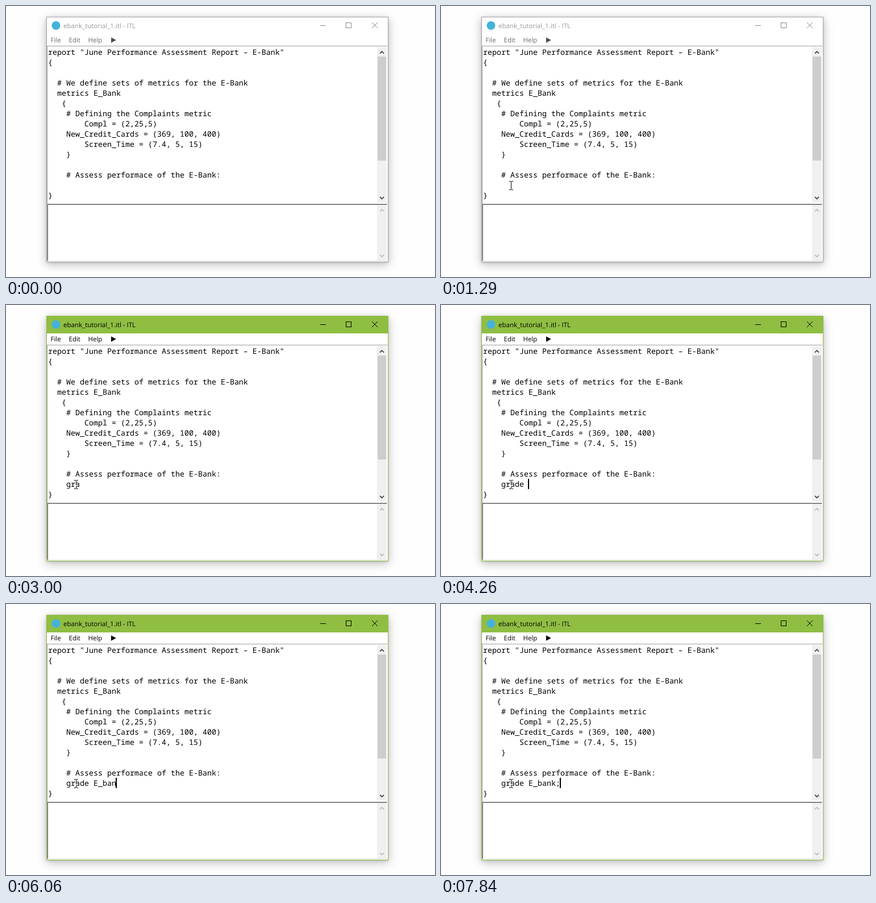
Recreate the animation shown at these times as an HTML page. Size 755 by 477 pixels, loop 8000 ms.

```html
<!DOCTYPE html>
<html lang="en">
<head>
<meta charset="utf-8">
<title>Editor</title>
<style>
  html, body { margin: 0; width: 100%; height: 100%; overflow: hidden; background: #fefefe; }
  #win {
    position: absolute; left: 71px; top: 19px; width: 602px; height: 432px;
    background: #fff;
    box-shadow: 0 1px 4px rgba(0, 0, 0, .14), 0 4px 16px rgba(0, 0, 0, .26);
  }
  svg { position: absolute; left: 0; top: 0; display: block; }
  text { white-space: pre; text-rendering: geometricPrecision; }
  .code text { font: 13.3333px "Noto Sans Mono", "DejaVu Sans Mono", monospace; }
  .ui { font: 11.5px "Open Sans", "Noto Sans", sans-serif; }
  .crisp { shape-rendering: crispEdges; }

  #frame { fill: #a6a6a6; }
  #bar { fill: #fff; }
  #title { fill: #999; }
  #buttons { stroke: #8a8a8a; fill: none; }
  #menu { fill: #6d6d6d; }
  #play { fill: #4d4d4d; }
  .active #frame, .active #bar { fill: #8fbe43; }
  .active #title, .active #menu, .active #play { fill: #000; }
  .active #buttons { stroke: #000; }
  #pointer { fill: #fff; mix-blend-mode: difference; }
</style>
</head>
<body>
<div id="win"></div>
<svg id="stage" width="755" height="477" viewBox="0 0 755 477">
  <g class="crisp">
    <path id="frame" d="M71 19h602v432h-602z"/>
    <path d="M72 20h600v430h-600z" fill="#fff"/>
    <path id="bar" d="M72 20h600v30h-600z"/>
  </g>
  <circle cx="88" cy="34.3" r="7.6" fill="#45b2da"/>
  <text id="title" class="ui" x="101" y="39">ebank_tutorial_1.itl - ITL</text>
  <g id="buttons">
    <path class="crisp" d="M553 34.5h10M598.5 29.5h9v9h-9z"/>
    <path d="M644 29l10 10M654 29l-10 10"/>
  </g>
  <g id="menu" class="ui">
    <text x="78.5" y="64">File</text>
    <text x="110.5" y="64">Edit</text>
    <text x="144.5" y="64">Help</text>
  </g>
  <path id="play" d="M185 55.3l8.8 4.7l-8.8 4.7z"/>
  <g id="panes"></g>
  <g id="code" class="code"></g>
  <path id="caret" class="crisp" d="M105 306h2v18h-2z"/>
  <path id="pointer" class="crisp" d="M0 0h3v1h1v-1h3v1h-3v14h3v1h-3v-1h-1v1h-3v-1h3v-14h-3z"/>
  <circle id="click" cx="121" cy="315.3" r="12" fill="#ff0" fill-opacity=".47"/>
</svg>
<script>
const LOOP = 8000, CLICK = 1540;
const COL = 8, ROW = 18, LEFT = 74, TOP = 72;
const $ = id => document.getElementById(id);

function add(parent, name, attrs) {
  const el = document.createElementNS("http://www.w3.org/2000/svg", name);
  for (const key in attrs) el.setAttribute(key, attrs[key]);
  return parent.appendChild(el);
}

// Panes with scrollbars
const panes = $("panes");
const rect = (x, y, width, height, fill) =>
  add(panes, "rect", { x, y, width, height, fill, class: "crisp" });
const chevron = (y, dir, stroke) =>
  add(panes, "path", {
    d: `M658 ${y + 2 * dir}l3.5 ${-3.5 * dir}l3.5 ${3.5 * dir}`,
    fill: "none", stroke, "stroke-width": 1.8
  });

// Top and left edges of a sunken box, then its white inside
function edge(inset, top, bottom, color) {
  rect(72 + inset, top + inset, 599 - 2 * inset, bottom - top - 2 * inset, color);
  rect(73 + inset, top + inset + 1, 599 - 2 * inset, bottom - top - 2 * inset, "#fff");
}

function scrollbar(top, bottom, arrow) {
  rect(653, top + 2, 17, bottom - top - 4, "#f0f0f0");
  chevron(top + 11.5, 1, arrow);
  chevron(bottom - 10, -1, arrow);
}

edge(0, 70, 348, "#a0a0a0");
edge(0, 348, 449, "#a0a0a0");
edge(1, 348, 449, "#696969");
rect(73, 448, 598, 1, "#e3e3e3");
scrollbar(70, 348, "#505050");
scrollbar(348, 450, "#bfbfbf");
rect(654, 89, 15, 183, "#cdcdcd");

// Editor text
function line(row, source) {
  const text = source.trimStart();
  const el = add($("code"), "text", {
    x: LEFT + COL * (source.length - text.length), y: TOP + ROW * row + 14
  });
  el.textContent = text;
  return el;
}
[
  'report "June Performance Assessment Report – E-Bank"',
  "{",
  "",
  "  # We define sets of metrics for the E-Bank",
  "  metrics E_Bank",
  "   {",
  "    # Defining the Complaints metric",
  "        Compl = (2,25,5)",
  "    New_Credit_Cards = (369, 100, 400)",
  "        Screen_Time = (7.4, 5, 15)",
  "    }",
  "",
  "    # Assess performace of the E-Bank:",
  "",
  "}"
].forEach((text, row) => line(row, text));

// One key press time per typed character
const TYPED = "grade E_bank;";
const PRESSES = [2240, 2470, 3000, 3390, 3470, 3790, 4580, 5120, 5740, 5910, 6060, 6210, 7140];
const typed = line(13, "    " + TYPED);

const caretOn = t => t >= CLICK && (t - 1500) % 905 < 590;

// Pointer path: time, x, y
const PATH = [[370, 186, 398], [900, 124, 331], [1010, 124, 331], [1290, 120, 308]];

function pointerAt(t) {
  const next = PATH.findIndex(point => point[0] > t);
  if (next === 0) return null;
  if (next < 0) return PATH.at(-1).slice(1);
  const [t0, ...from] = PATH[next - 1], [t1, ...to] = PATH[next];
  return from.map((v, i) => Math.round(v + (to[i] - v) * (t - t0) / (t1 - t0)));
}

const show = (el, on) => el.setAttribute("visibility", on ? "visible" : "hidden");
const move = (el, x, y) => el.setAttribute("transform", `translate(${x} ${y})`);

function render(t) {
  $("stage").classList.toggle("active", t >= CLICK);
  show($("click"), t >= CLICK && t < CLICK + 70);

  const count = PRESSES.filter(press => press <= t).length;
  typed.textContent = TYPED.slice(0, count);
  show($("caret"), caretOn(t));
  move($("caret"), COL * count, 0);

  const pos = pointerAt(t);
  show($("pointer"), pos);
  if (pos) move($("pointer"), ...pos);
}

const begin = performance.now();
function tick(now) {
  render(Math.max(0, now - begin) % LOOP);
  requestAnimationFrame(tick);
}
render(0);
requestAnimationFrame(tick);
</script>
</body>
</html>
```
